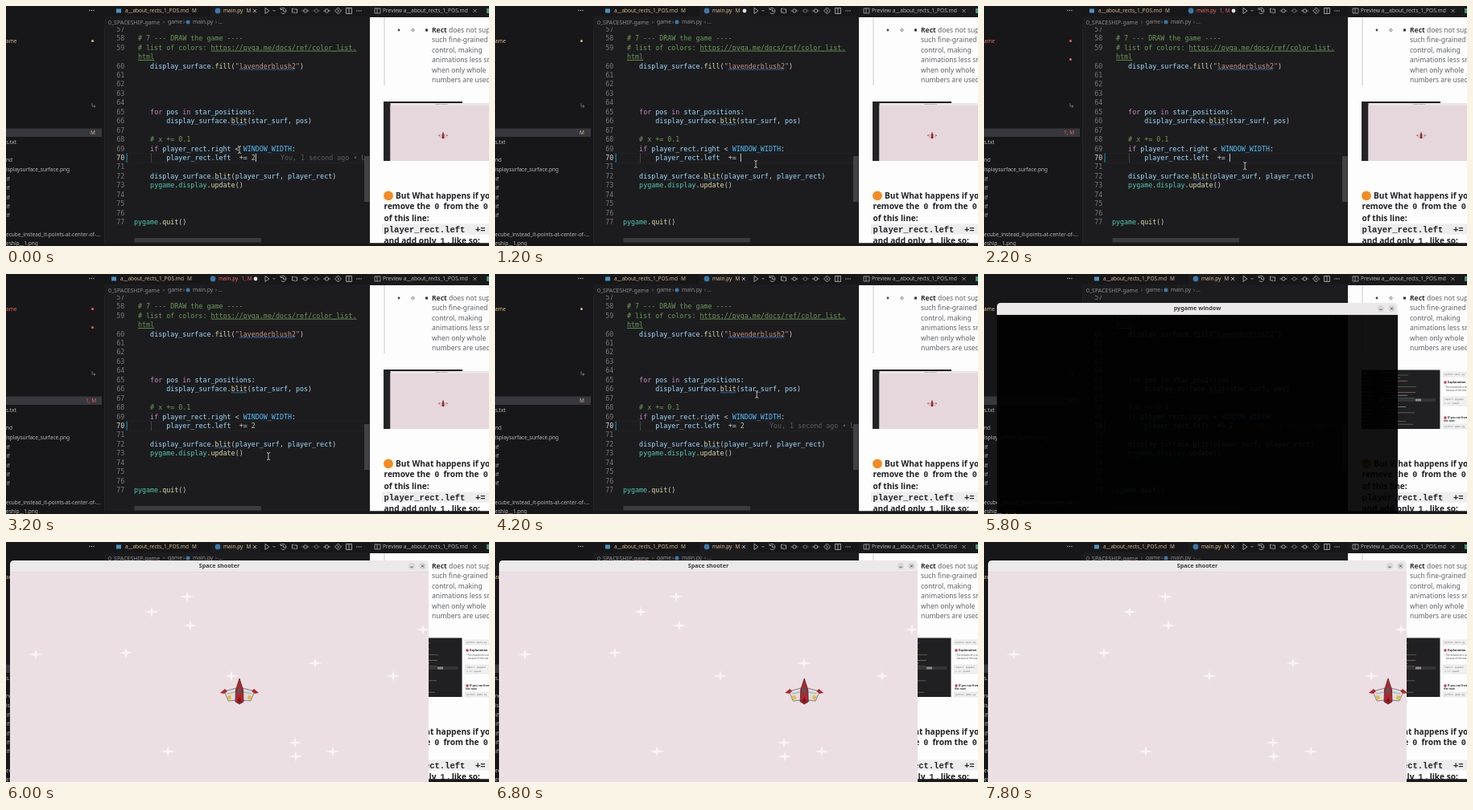
An HTML page for the animation above (8 s loop, 600 by 299 pixels).

```html
<!DOCTYPE html>
<html lang="en">
<head>
<meta charset="utf-8">
<title>Editor and game window</title>
<style>
html, body { margin: 0; width: 100%; height: 100%; overflow: hidden; background: #1c1c1e; }
svg { display: block; width: 100vw; height: 100vh; }
text { white-space: pre; font-family: "Noto Sans", sans-serif; }
.mono { font-family: "DejaVu Sans Mono", monospace; }
.key { font-family: "Liberation Mono", monospace; }
.bold { font-weight: 700; }
</style>
</head>
<body>
<svg id="stage" viewBox="0 0 600 299" preserveAspectRatio="none"></svg>
<script>
const LOOP = 8000, STEP = 200;
const CHAR = 5.03, LEFT = 159;
const FAULTY = '2000-3800', CLEAN = '0-2000,3800-8000';
const C = {
  text: '#cccccc', dim: '#8b8b8f', modified: '#d8b884', error: '#f0625f',
  comment: '#6a9955', name: '#9cdcfe', call: '#dcdcaa', string: '#ce9178',
  keyword: '#c586c0', module: '#4ec9b0', constant: '#4fc1ff', number: '#b5cea8'
};

const rect = (x, y, w, h, fill, extra = '') =>
  `<rect x="${x}" y="${y}" width="${w}" height="${h}" fill="${fill}" ${extra}/>`;
const dot = (x, y, r, fill, extra = '') =>
  `<circle cx="${x}" cy="${y}" r="${r}" fill="${fill}" ${extra}/>`;
const line = (d, stroke, width = 1, extra = '') =>
  `<path d="${d}" fill="none" stroke="${stroke}" stroke-width="${width}" ${extra}/>`;
const shape = (d, fill, extra = '') => `<path d="${d}" fill="${fill}" ${extra}/>`;
const cross = (x, y, color) => line(`M${x - 2} ${y - 2}l4 4m0 -4l-4 4`, color, 0.8);
const dots = (x, y, color) => [0, 2.5, 5].map(dx => dot(x + dx, y, 0.65, color)).join('');
// y is the middle of the text line
const text = (x, y, s, fill = C.text, size = 6.5, cls = '', extra = '') =>
  `<text x="${x}" y="${y + size * 0.36}" fill="${fill}" font-size="${size}" class="${cls}" ${extra}>${s}</text>`;
// spans: "from-to" in ms, several joined by commas
const during = (spans, body) => `<g data-on="${spans}">${body}</g>`;

const rowY = n => 74.6 + (n - 60) * 11.44;

function code(n, col, ...parts) {
  const spans = parts.map(([s, color]) =>
    `<tspan fill="${color}">${s.replace(/</g, '&lt;')}</tspan>`).join('');
  return text(LEFT + col * CHAR, rowY(n), spans, C.text, 8.35, 'mono');
}

function squiggle(n, col, count) {
  const x = LEFT + col * CHAR, y = rowY(n) + 5;
  let d = `M${x} ${y}`;
  for (let i = 1; i <= count * CHAR / 1.5; i++) d += `L${x + i * 1.5} ${y - (i % 2) * 1.2}`;
  return line(d, '#3794ff', 0.7);
}

function ship() {
  const wing = shape('M-4 -4L-19 0L-14 12L-3 11Z', '#dcdde0', 'stroke="#6a6d71" stroke-width=".8"')
    + shape('M-24 2L-18 -3L-15 0L-19 3Z', '#b5242b')
    + shape('M-16 6L-11 5L-10 9L-13 11Z', '#e9b93a')
    + line('M-5 1L-15 3', '#96999d', 0.8);
  return wing + `<g transform="scale(-1 1)">${wing}</g>`
    + shape('M0 -16L4.5 -2L5 13L0 16L-5 13L-4.5 -2Z', '#b5242b', 'stroke="#512026" stroke-width=".8"')
    + shape('M0 -7L2.5 0L0 5L-2.5 0Z', '#53565c')
    + shape('M-3 12L0 7L3 12L0 15Z', '#7c1a21');
}

function sidebar() {
  const files = [[170, 's.txt'], [192, 'nd'], [204, 'isplaysurface_surface.png'],
    [284.3, 'ecube_instead_it-points-at-center-of-...'], [295.3, 'eship__1.png']];
  let out = rect(0, 0, 122, 299, '#171719') + rect(0, 152.5, 119, 10.5, '#37373d') + dots(104, 5.5, '#b9b9bc')
    + files.map(([y, s]) => text(0, y, s, '#b7b7ba')).join('');
  for (let i = 0; i < 5; i++) out += text(-3.5, 215.3 + i * 11.45, 'gif', '#b7b7ba');
  out += line('M107 121V125H111M109 123.5L111 125L109 126.5', C.dim, 0.7);
  const status = (color, label, x) => text(0, 43.3, 'ame', color) + dot(107.5, 43.5, 1.5, color)
    + text(x, 158, label, color);
  return out + during(CLEAN, status(C.modified, 'M', 105))
    + during(FAULTY, status(C.error, '1, M', 99) + dot(107.5, 66.5, 1.5, C.error));
}

function toolbar() {
  const ink = '#b9b9bc', faint = '#77777a';
  const commit = (x, color) => dot(x, 6, 2.2, 'none', `stroke="${color}" stroke-width=".8"`)
    + line(`M${x - 4.5} 6H${x - 2}M${x + 2} 6H${x + 4.5}`, color, 0.7);
  return line('M322 2.5L327 6L322 9.5ZM331.5 5L333 6.5L334.5 5', ink, 0.8)
    + line('M341.5 4A3.5 3.5 0 1 1 341.5 8M344.5 4V6.5H347M341 2V4.5H343.5', ink, 0.8)
    + line('M355.5 3V8H359M361.5 9V4H358M357.5 2.5L356 4M359 9.5L360.5 8', ink, 0.8)
    + commit(372, ink) + commit(385.5, faint) + commit(398.5, ink)
    + line('M412.5 2L416.5 6L412.5 10L408.5 6ZM411.5 4.5L413.5 6L411.5 8', ink, 0.8)
    + line('M422.5 2.5H429.5V9.5H422.5ZM426 2.5V9.5', ink, 0.8) + dots(436, 6, ink);
}

function tabs() {
  const pair = (color, label) => rect(137, 3.5, 6, 5, '#4a94bd')
    + text(148, 6, 'a__about_rects_1_POS.md', C.modified) + text(231, 6, 'M', C.modified)
    + dot(263, 6, 3.4, '#3c78aa') + text(270, 6, 'main.py', color) + text(298.5, 6, label, color);
  return rect(122, 0, 330, 13, '#17171a') + rect(254, 0, 62, 13, '#1c1c1e')
    + during(CLEAN, pair(C.modified, 'M'))
    + during(FAULTY, `<g transform="translate(-6 0)">${pair(C.error, '1, M')}</g>`)
    + during('0-1000,3600-8000', cross(309, 6, '#c5c5c7'))
    + during('1000-3600', dot(310, 6, 2.4, '#e4e4e4'))
    + toolbar()
    + text(127, 20, '0_SPACESHIP-game', C.dim, 7) + text(195, 20, '›', C.dim)
    + text(201, 20, 'game', C.dim, 6.8) + text(220, 20, '›', C.dim) + dot(226, 20, 2.5, '#3c78aa')
    + text(232, 20, 'main.py', C.dim, 6.7) + text(260, 20, '› …', C.dim);
}

function editor() {
  const { name, call, text: plain, keyword, module, comment } = C;
  let out = rect(122, 0, 330, 299, '#1c1c1e') + rect(122, 13, 0.8, 286, '#28282a')
    + rect(159.5, 289, 157.5, 5.5, '#3c3c3e') + rect(445, 187, 6.5, 57, '#424244')
    + rect(152, 183.5, 293, 0.7, '#262628') + rect(152, 194.8, 293, 0.7, '#262628')
    + rect(149.5, 183.5, 1.2, 11.4, '#1b81a8') + rect(180, 183.5, 0.7, 11.4, '#56565a');
  // line 59 wraps, so the numbers before 60 sit one row higher
  for (let n = 57; n <= 77; n++)
    out += text(147.3, rowY(n < 60 ? n - 1 : n), n, n === 70 ? '#d4d4d4' : '#77777b', 8.35, 'mono', 'text-anchor="end"');
  const link = (n, col, s) =>
    text(LEFT + col * CHAR, rowY(n), s, comment, 8.35, 'mono', 'text-decoration="underline"');
  out += code(57, 1, ['# 7 --- DRAW the game ----', comment])
    + code(58, 1, ['# list of colors: ', comment])
    + link(58, 19, 'https://pyga.me/docs/ref/color_list.') + link(59, 1, 'html')
    + code(60, 4, ['display_surface', name], ['.', plain], ['fill', call], ['(', plain], ['"lavenderblush2"', C.string], [')', plain])
    + squiggle(60, 26, 14)
    + code(65, 4, ['for', keyword], [' pos ', name], ['in', keyword], [' star_positions', name], [':', plain])
    + code(66, 8, ['display_surface', name], ['.', plain], ['blit', call], ['(', plain], ['star_surf', name], [', ', plain], ['pos', name], [')', plain])
    + squiggle(66, 24, 4)
    + code(68, 4, ['# x += 0.1', comment])
    + code(69, 4, ['if', keyword], [' player_rect', name], ['.', plain], ['right', name], [' < ', plain], ['WINDOW_WIDTH', C.constant], [':', plain])
    + code(70, 8, ['player_rect', name], ['.', plain], ['left', name], ['  += ', plain])
    + during('0-1000,2600-8000', code(70, 29, ['2', C.number]))
    + code(72, 4, ['display_surface', name], ['.', plain], ['blit', call], ['(', plain], ['player_surf', name], [', ', plain], ['player_rect', name], [')', plain])
    + squiggle(72, 20, 4)
    + code(73, 4, ['pygame', module], ['.', plain], ['display', module], ['.', plain], ['update', call], ['()', plain])
    + code(77, 0, ['pygame', module], ['.', plain], ['quit', call], ['()', plain]);
  const note = text(341, rowY(70), 'You, 1 second ago • Uncommitted changes', '#5c5c60', 8.35, 'mono');
  out += during('0-1000,4000-8000', `<g clip-path="url(#code)">${note}</g>`);
  return out + rect(122, 13, 330, 13.5, '#1c1c1e');
}

function recording() {
  const game = rect(469, 121, 131, 72, '#e9e4e6') + rect(469, 119, 98, 2, '#1f1f21')
    + rect(469, 121, 8.5, 72, '#242426') + rect(477.5, 124, 122.5, 69, '#e6d7dd')
    + text(541, 122.6, 'Space shooter', '#777', 2.2, 'bold', 'text-anchor="middle"')
    + `<g transform="translate(543 161) scale(.26)">${ship()}</g>`;
  let shot = rect(469, 119, 131, 74, '#fdfdfd') + rect(469, 119.5, 97.5, 73.5, '#202022');
  const inks = [C.name, C.comment, C.dim, C.string];
  for (let i = 0; i < 19; i++) {
    if (i % 6 === 4) continue;
    const x = 494 + (i % 3) * 4, w = 12 + (i * 17) % 31;
    shot += rect(x, 122 + i * 3.6, w, 0.8, inks[i % 4], 'opacity=".65"');
  }
  for (let i = 0; i < 15; i++) shot += rect(470, 124 + i * 4.5, 5 + (i * 7) % 9, 0.7, '#777');
  shot += rect(490, 155, 71, 4, '#353538') + rect(536, 155.5, 7, 3, '#8b8b8f')
    + [[122, 6], [153, 11], [187, 6]].map(([y, h]) => rect(570.5, y, 30, h, '#f0f0f0', 'stroke="#d5d5d5" stroke-width=".5"')).join('')
    + text(572, 125, 'python main.py', '#777', 3, 'mono') + text(572, 156, 'import pygame', '#777', 3, 'mono')
    + text(572, 161, 'x += speed', '#777', 3, 'mono') + text(572, 190, 'python game.py', '#777', 3, 'mono')
    + dot(573, 135, 1.8, '#dc3545') + text(576, 135, 'Explanation', '#222', 3.8, 'bold')
    + text(572, 141, '• The movement is smooth', '#555', 2.8) + text(574, 145, 'because of the rate', '#555', 2.8)
    + dot(573, 179, 1.8, '#dc3545') + text(576, 179, 'If you run from above', '#222', 3.3, 'bold')
    + text(571, 183, 'the root:', '#222', 3.3, 'bold');
  return during('0-4400', game) + during('4400-8000', shot);
}

function preview() {
  const ink = '#202124', grey = '#606266';
  const para = ['such fine-grained', 'control, making', 'animations less smooth', 'when only whole', 'numbers are used.'];
  const heading = (x, y, s) => text(x, y, s, ink, 10.1, 'bold');
  const chip = (s, after) => `<tspan class="key" dx="2.5">${s}</tspan><tspan dx="2.5">${after}</tspan>`;
  return rect(452, 0, 148, 14, '#1a1a1c') + rect(452, 14, 148, 281.5, '#fdfdfd')
    + line('M458 3H465V9H458ZM461 3V9', '#a9a9ad', 0.8)
    + text(468, 6, 'Preview a__about_rects_1_POS.md', '#b4b4b8', 6.6)
    + cross(582.5, 6, '#a9a9ad') + rect(597, 3, 3, 6, '#3f9a72')
    + rect(469.5, 14, 1, 85, '#c9cacc')
    + dot(488, 30, 1.4, '#444') + dot(505.5, 30, 1.5, 'none', 'stroke="#444" stroke-width=".7"') + rect(521, 28.5, 3, 3, '#333')
    + text(529, 29.8, '<tspan font-weight="700" fill="#333">Rect</tspan> does not support', grey, 8.5)
    + para.map((s, i) => text(529, 42.4 + i * 12.45, s, grey, 8.5)).join('')
    + recording()
    + dot(475, 236.3, 5.9, '#f58a1f')
    + heading(484, 236.2, 'But What happens if you')
    + heading(469.5, 249.8, `remove the ${chip('0', ' from the ')}${chip('0.1', '')}`)
    + heading(469.5, 264.3, 'of this line:')
    + rect(467, 271.5, 133, 13, '#ededee') + text(469.5, 278, 'player_rect.left  += 2', ink, 10.5, 'key bold')
    + heading(469.5, 292, `and add only ${chip('1', ', like so:')}`)
    + rect(122, 295.5, 478, 3.5, '#19191b');
}

function frameWindow(x, y, w, h, title, body, fill, opacity = 1) {
  const bar = `M${x} ${y + 15}V${y + 5}q0 -5 5 -5H${x + w - 5}q5 0 5 5V${y + 15}Z`;
  const right = x + w, mid = y + 7;
  return rect(x, y + 15, w, h - 15, fill, `fill-opacity="${opacity}"`) + body + shape(bar, '#ebe9ea')
    + rect(x, y + 14.4, w, 0.6, '#d6d2d4')
    + text(x + w / 2, mid - 0.4, title, '#3b3b3d', 7.2, 'bold', 'text-anchor="middle"')
    + dot(right - 21, mid, 4.2, '#d9d7d8') + dot(right - 7.5, mid, 4.2, '#d9d7d8')
    + line(`M${right - 22.7} ${mid + 1.2}h3.4M${right - 9} ${mid - 1.5}l3 3m0 -3l-3 3`, '#3b3b3d', 0.8);
}

function gameWindow() {
  const stars = [[181, 87], [225, 68], [229, 104], [37, 140], [149, 138], [280, 167], [384, 151],
    [481, 167], [518, 109], [201, 261], [359, 250], [360, 267], [406, 261]];
  const star = ([x, y]) => shape(
    `M${x} ${y - 7}l1.4 5.5l7.6 1.5l-7.6 1.5l-1.4 5.5l-1.4 -5.5l-7.6 -1.5l7.6 -1.5Z`, '#f8f5f6');
  const body = `<g clip-path="url(#game)">${stars.map(star).join('')}</g><g id="ship">${ship()}</g>`;
  return frameWindow(5, 23, 520, 280, 'Space shooter', body, '#ecdfe4');
}

const stage = document.getElementById('stage');
stage.innerHTML = `<defs><clipPath id="code">${rect(122, 13, 323, 286, '#000')}</clipPath>`
  + `<clipPath id="game">${rect(5, 38, 520, 261, '#000')}</clipPath></defs>`
  + editor() + sidebar() + tabs() + preview()
  + rect(0, 184, 0.9, 10, '#d8d8d8', 'id="caret"')
  + `<g id="mouse">${line('M-2 -4.5Q0 -4.5 0 -3V3Q0 4.5 -2 4.5M2 -4.5Q0 -4.5 0 -3M0 3Q0 4.5 2 4.5', '#dcdcdc', 0.8)}</g>`
  + during('5800-6000', frameWindow(16, 36, 498, 262, 'pygame window', '', '#000', 0.93))
  + during('6000-8000', gameWindow());

const find = id => document.getElementById(id);
const timed = [...stage.querySelectorAll('[data-on]')].map(el => ({
  el, spans: el.dataset.on.split(',').map(s => s.split('-').map(Number))
}));
const mousePath = [[0, 290, 179], [1000, 324, 197], [2000, 324, 197], [3200, 326, 227], [3800, 326, 227], [4800, 324, 8]];
const lastKey = t => t >= 2600 ? 2600 : t >= 1000 ? 1000 : 0;

function mouseAt(t) {
  const i = mousePath.findIndex(p => p[0] > t);
  if (i < 0) return mousePath[mousePath.length - 1].slice(1);
  const [t0, x0, y0] = mousePath[i - 1], [t1, x1, y1] = mousePath[i];
  const k = (t - t0) / (t1 - t0), e = k * k * (3 - 2 * k);
  return [x0 + (x1 - x0) * e, y0 + (y1 - y0) * e];
}

function draw(now) {
  const t = Math.floor(now % LOOP / STEP) * STEP;
  for (const { el, spans } of timed)
    el.style.display = spans.some(([a, b]) => t >= a && t < b) ? '' : 'none';

  const empty = t >= 1000 && t < 2600;
  const blinkOn = Math.floor((t - lastKey(t)) / 500) % 2 === 0;
  find('caret').setAttribute('x', LEFT + (empty ? 29 : 30) * CHAR);
  find('caret').style.display = blinkOn && t < 4800 ? '' : 'none';

  find('mouse').setAttribute('transform', `translate(${mouseAt(t)})`);
  find('mouse').style.display = t < 5000 ? '' : 'none';
  find('ship').setAttribute('transform', `translate(${290 + (t - 6000) / 1800 * 212} 186)`);
}

function tick(now) {
  draw(now);
  requestAnimationFrame(tick);
}
draw(0);
requestAnimationFrame(tick);
</script>
</body>
</html>
```
